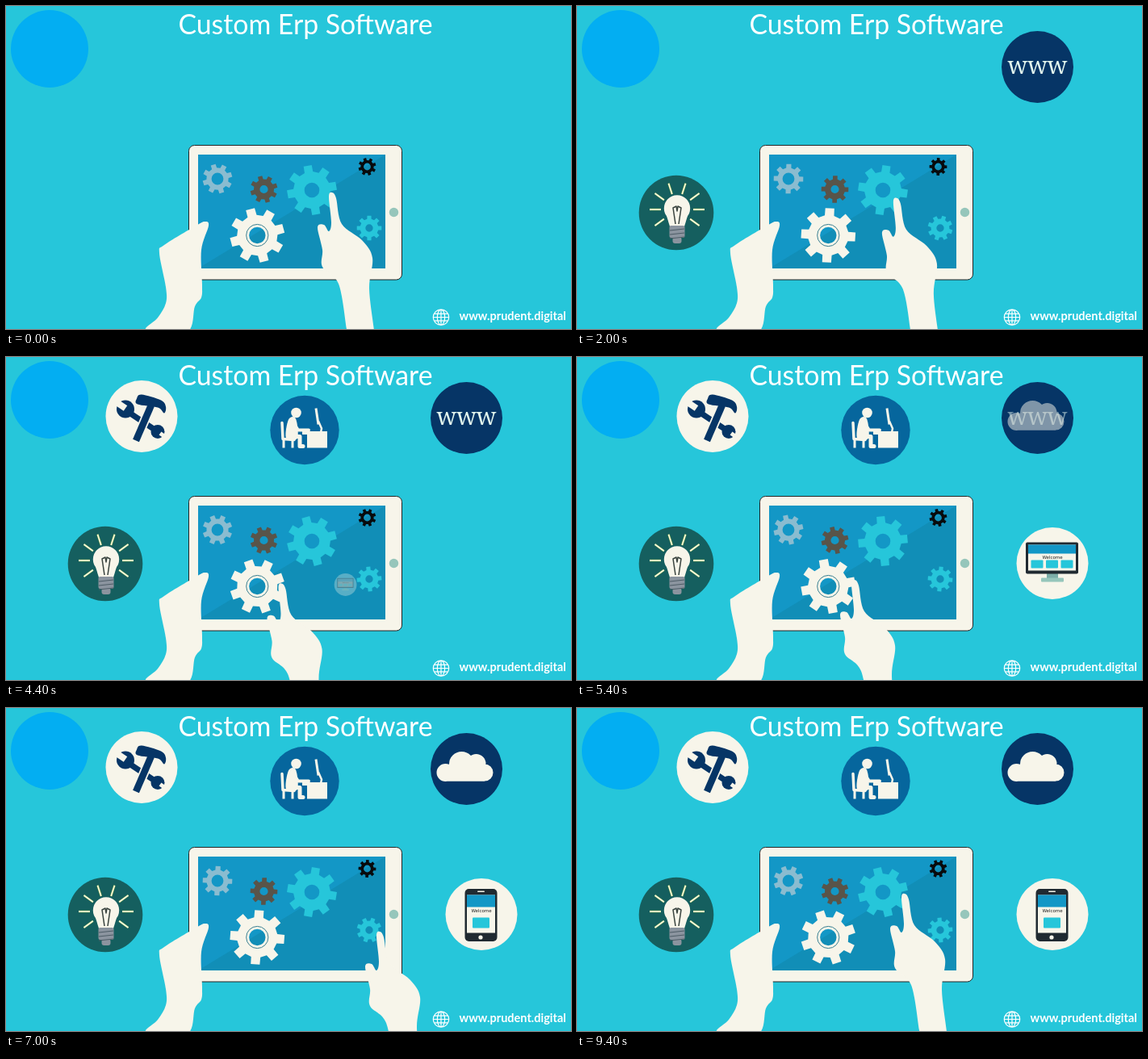
An HTML page with a canvas that plays this animation: 700x400 px, repeating every 9800 ms.

```html
<!DOCTYPE html>
<html lang="en">
<head>
<meta charset="utf-8">
<title>Custom Erp Software</title>
<style>
html, body { margin: 0; width: 100%; height: 100%; overflow: hidden; background: #26c6da; }
canvas { display: block; }
</style>
</head>
<body>
<canvas id="stage" width="700" height="400"></canvas>
<script>
const ctx = document.getElementById('stage').getContext('2d');
const LOOP = 9800, STEP = 200, TAU = Math.PI * 2;
const CYAN = '#26c6da', CREAM = '#f7f5ea', NAVY = '#063566', BLUE = '#1397c6', DARK = '#202a31';

const clamp = v => Math.max(0, Math.min(1, v));
const mix = (a, b, p) => a + (b - a) * p;
const ramp = (t, start) => clamp((t - start) / 800);

function disc(x, y, r, color) {
  ctx.fillStyle = color;
  ctx.beginPath();
  ctx.arc(x, y, r, 0, TAU);
  ctx.fill();
}

function box(x, y, w, h, color, r = 0) {
  ctx.fillStyle = color;
  ctx.beginPath();
  ctx.roundRect(x, y, w, h, r);
  ctx.fill();
}

function line(points, width, color, cap = 'butt') {
  ctx.beginPath();
  points.forEach(p => ctx.lineTo(...p));
  ctx.lineWidth = width;
  ctx.strokeStyle = color;
  ctx.lineCap = cap;
  ctx.lineJoin = 'round';
  ctx.stroke();
}

function poly(points, color) {
  ctx.beginPath();
  points.forEach(p => ctx.lineTo(...p));
  ctx.fillStyle = color;
  ctx.fill();
}

// Closed smooth outline through every point (Catmull-Rom)
function blob(points, color) {
  const at = i => points[(i + points.length) % points.length];
  ctx.beginPath();
  ctx.moveTo(...at(0));
  for (let i = 0; i < points.length; i++) {
    const [a, b, c, d] = [at(i - 1), at(i), at(i + 1), at(i + 2)];
    ctx.bezierCurveTo(
      b[0] + (c[0] - a[0]) / 6, b[1] + (c[1] - a[1]) / 6,
      c[0] - (d[0] - b[0]) / 6, c[1] - (d[1] - b[1]) / 6, ...c);
  }
  ctx.fillStyle = color;
  ctx.fill();
}

function text(str, x, y, font, color, align = 'center') {
  ctx.font = font;
  ctx.fillStyle = color;
  ctx.textAlign = align;
  ctx.fillText(str, x, y);
}

function withAlpha(alpha, draw) {
  if (alpha <= 0) return;
  ctx.save();
  ctx.globalAlpha *= alpha;
  draw();
  ctx.restore();
}

function crossfade(p, before, after) {
  withAlpha(1 - p, before);
  withAlpha(p, after);
}

function tablet() {
  box(226.5, 172.5, 264, 166.5, CREAM, 7);
  ctx.strokeStyle = '#242424';
  ctx.lineWidth = 1;
  ctx.stroke();
  box(238, 184, 232, 141, BLUE);
  poly([[238, 325], [470, 184], [470, 325]], '#118eb7');
  disc(480.5, 255.5, 5.7, '#96c6bb');
}

const gears = [
  { x: 262, y: 214, r: 18.5, color: '#8abcd0', phase: 28, hole: 0.4 },
  { x: 319.5, y: 227, r: 17, color: '#595449', phase: 28 },
  { x: 379, y: 228, r: 31, color: CYAN, phase: -10 },
  { x: 447.5, y: 199, r: 11, color: '#080a0c', phase: 28, hole: 0.4 },
  { x: 450, y: 275, r: 15.5, color: CYAN, phase: 0 },
  { x: 311.3, y: 284, r: 34, color: CREAM, phase: 30 }
];

function drawGear({ x, y, r, color, phase, hole = 0.3 }, t) {
  const start = (phase + t / LOOP * 90) * TAU / 360;
  ctx.beginPath();
  for (let i = 0; i < 8; i++) {
    const a = start + i * TAU / 8;
    for (const [off, rad] of [[-0.23, 0.74], [-0.165, 1], [0.165, 1], [0.23, 0.74]])
      ctx.lineTo(x + Math.cos(a + off) * rad * r, y + Math.sin(a + off) * rad * r);
  }
  ctx.closePath();
  ctx.moveTo(x + hole * r, y);
  ctx.arc(x, y, hole * r, 0, TAU);
  ctx.fillStyle = color;
  ctx.fill('evenodd');
  if (color !== CREAM) return;
  ctx.beginPath();
  ctx.arc(x, y, r * 0.4, 0, TAU);
  ctx.strokeStyle = '#397f91';
  ctx.lineWidth = 1;
  ctx.stroke();
}

// Icons are drawn around their own centre
function bulb() {
  for (let i = 0; i < 8; i++) {
    const a = (i - 6) * TAU / 10, c = Math.cos(a), s = Math.sin(a);
    const ray = [20, 34].map(r => [1 + c * r, s * r - 4]);
    line(ray, 2.6, '#7eaa4b');
    line(ray, 1.6, '#fffbe2');
  }
  disc(1, -5.5, 16.2, CREAM);
  poly([[-12, 4], [14, 4], [10, 17], [-8, 17]], CREAM);
  line([[-1, 14], [-4, -6], [0, -8], [1, -2], [2, -8], [6, -6], [3, 14]], 1.5, '#38423e');
  box(-8.5, 16, 19, 15, '#8b949f', 2);
  box(-4.5, 30, 11, 8, '#8b949f', 3);
  for (let y = 21; y < 34; y += 5) line([[-8, y + 1], [10, y - 1]], 1, '#4d5c66');
}

function cloud() {
  ctx.beginPath();
  for (const [x, y, r] of [[-26, 4.5, 11], [-6, -6, 15.5], [12, -6.5, 12], [22.5, 4.5, 10.5]]) {
    ctx.moveTo(x + r, y);
    ctx.arc(x, y, r, 0, TAU);
  }
  ctx.rect(-26, -2, 48.5, 17.3);
  ctx.fillStyle = CREAM;
  ctx.fill();
}

function web(t) {
  crossfade(ramp(t, 5000),
    () => text('www', 0, 8, '28.6px "Noto Serif", serif', '#e2f5ee'), cloud);
}

function tools() {
  line([[-16, -5], [20, 19]], 7, NAVY);
  disc(-20, -9, 11, NAVY);
  line([[-32, -18], [-20, -10]], 8, CREAM);
  disc(20, 19, 8.5, NAVY);
  line([[23, 21], [33, 28]], 5, CREAM);
  for (const [width, color] of [[12, CREAM], [8.5, NAVY]]) line([[12, -14], [-7, 30]], width, color);
  blob([[-6, -22], [0, -27], [24, -20], [30, -12], [28, -4], [20, -11], [-5, -15]], NAVY);
}

function worker() {
  disc(-10.5, -21.5, 6.3, CREAM);
  blob([[-20, -13], [-11, -14], [-9, 10], [-23, 10]], CREAM);
  line([[-14, -9], [-8, 0], [5, 0]], 4, CREAM, 'round');
  line([[-18, 8], [-6, 8], [-6, 20], [-2, 20]], 5, CREAM, 'round');
  line([[-28, -9], [-27, 11], [-13, 12]], 3.5, CREAM, 'round');
  for (const x of [-26, -15]) line([[x, 11], [x, 22]], 3, CREAM);
  box(-3, 1.5, 31, 4, CREAM);
  box(3, 5, 25, 17, CREAM);
  line([[14, -27], [17, -7]], 3, CREAM);
  line([[17, -11], [21, -2], [20, 3]], 2.5, CREAM);
}

function welcome(y) {
  text('Welcome', 0, y, '5.5px "DejaVu Sans", sans-serif', '#222');
}

function desktop() {
  box(-7, 11, 14, 9, '#7caea8');
  box(-14, 18, 28, 5, '#96c6bb', 1);
  box(-33, -26, 65, 39, DARK, 2);
  box(-30, -23, 59, 32, CREAM);
  box(-30, -23, 59, 11, BLUE);
  welcome(-6);
  for (let i = -1; i < 2; i++) box(i * 18.5 - 8, -4, 15, 10, CYAN, 1);
}

function phone() {
  box(-20.5, -31.5, 40, 65, DARK, 5);
  box(-18, -24, 35, 47, CREAM);
  box(-18, -24, 35, 15, BLUE);
  box(-5, -29, 9, 1.6, CREAM, 1);
  welcome(-3);
  box(-11, 4, 21, 13, CYAN, 1);
  disc(-1, 28.5, 2.6, CREAM);
}

const device = t => crossfade(ramp(t, 6000), desktop, phone);

const icons = [
  { draw: bulb, x: 123, y: 256, r: 46.3, color: '#155f5f', start: 0 },
  { draw: web, x: 570.5, y: 75.5, r: 44.5, color: NAVY, start: 1200 },
  { draw: tools, x: 168, y: 73.5, r: 44.5, color: CREAM, start: 2400 },
  { draw: worker, x: 370, y: 90.5, r: 42.7, color: '#06669d', start: 3000 },
  { draw: device, x: 589, y: 255.5, r: 44.5, color: CREAM, start: 4150 }
];

// Each icon grows and fades in while flying out of the tablet
function flyOut({ draw, x, y, r, color, start }, t) {
  const p = ramp(t, start);
  withAlpha(p, () => {
    ctx.translate(mix(344, x, p), mix(294, y, p));
    ctx.scale(p, p);
    disc(0, 0, r, color);
    draw(t);
  });
}

const leftHand = [[174, 402], [188, 386], [198, 368], [198, 348], [190, 306], [196, 296], [234, 273],
  [246, 267], [251, 272], [242, 302], [243, 345], [242, 361], [234, 372], [224, 404]];
const rightHand = [[404, 231], [409, 238], [416, 270], [441, 290], [454, 312], [450, 350], [456, 402],
  [457, 420], [425, 420], [422, 400], [412, 344], [392, 323], [392, 302], [386, 274], [394, 271],
  [400, 279], [403, 268], [400, 236]];

// The pointing hand goes from the cyan gear to the white one, the small one and back
const stops = [
  { at: 0, x: 0, y: 0 }, { at: 1800, x: 0, y: 0 }, { at: 3400, x: -65, y: 54 }, { at: 5400, x: -60, y: 45 },
  { at: 7000, x: 59, y: 46 }, { at: 7400, x: 59, y: 46 }, { at: 9400, x: 2, y: -1 }
];

function hands(t) {
  const next = stops.findIndex(s => s.at >= t && s.at > 0);
  const a = stops[next - 1], b = stops[next];
  const p = (t - a.at) / (b.at - a.at);
  blob(leftHand, CREAM);
  ctx.save();
  ctx.translate(mix(a.x, b.x, p), mix(a.y, b.y, p));
  blob(rightHand, CREAM);
  ctx.restore();
}

function globe(x, y, r) {
  ctx.strokeStyle = '#fff';
  ctx.lineWidth = 1.2;
  ctx.beginPath();
  for (const w of [0, 0.48, 1]) {
    ctx.moveTo(x + r * w, y);
    ctx.ellipse(x, y, r * w, r, 0, 0, TAU);
  }
  for (const dy of [-0.45, 0, 0.45]) {
    const w = Math.sqrt(1 - dy * dy);
    ctx.moveTo(x - r * w, y + dy * r);
    ctx.lineTo(x + r * w, y + dy * r);
  }
  ctx.stroke();
}

function render(t) {
  ctx.fillStyle = CYAN;
  ctx.fillRect(0, 0, 700, 400);
  disc(54, 53, 48, '#03aef2');
  text('Custom Erp Software', 371, 35, '33.8px Lato, sans-serif', '#fff');
  tablet();
  gears.forEach(gear => drawGear(gear, t));
  icons.forEach(icon => flyOut(icon, t));
  hands(t);
  globe(539, 385.5, 9.7);
  text('www.prudent.digital', 561.5, 389, 'bold 14.5px Lato, sans-serif', '#fff', 'left');
}

function tick() {
  const now = performance.now() % LOOP;
  render(Math.min(LOOP - 2 * STEP, Math.floor(now / STEP) * STEP));
  requestAnimationFrame(tick);
}
tick();
</script>
</body>
</html>
```
